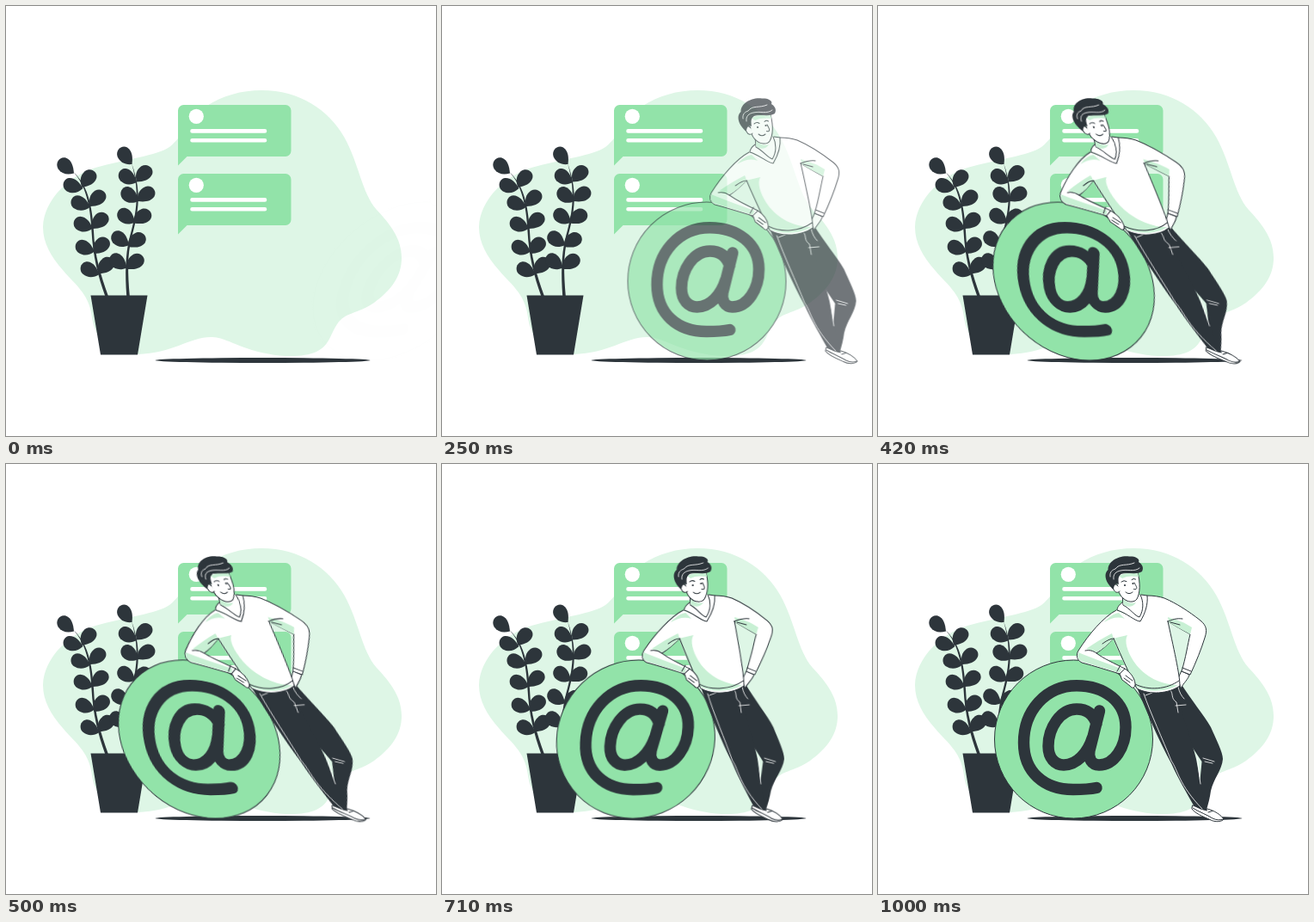
An HTML page without scripts for the animation above (1.04 s loop, 500x500 px).

```html
<!DOCTYPE html>
<html lang="en">
<head>
<meta charset="utf-8">
<title>Leaning on the at sign</title>
<style>
  html, body { margin: 0; width: 100%; height: 100%; overflow: hidden; background: #fff; }
  svg { display: block; width: 100vw; height: 100vh; }
  .dark { fill: #2d353b; }
  .mint { fill: #92e3a9; }
  .pale { fill: #def6e6; }
  .shade { fill: #c8f0d4; }
  .white { fill: #fff; }
  .ink { stroke: #2d353b; stroke-width: 1; stroke-linecap: round; stroke-linejoin: round; }
  .line { fill: none; }
  .seam { fill: none; stroke: #fff; stroke-width: .8; stroke-linecap: round; }
  .bar { stroke: #fff; stroke-width: 4.6; stroke-linecap: round; }
  .at { fill: none; stroke: #2d353b; stroke-width: 13.4; stroke-linecap: round; stroke-linejoin: round; }

  .slide {
    transform-box: view-box;
    transform-origin: 250px 262px;
    animation: slide 1.04s infinite;
  }
  /* fast slide from the right, then two settling sways */
  @keyframes slide {
    0% {
      transform: translateX(248.2px) skewX(-19.8deg);
      opacity: .0073;
      animation-timing-function: cubic-bezier(.342, .109, .499, 1.365);
    }
    54.9% {
      transform: skewX(10deg);
      opacity: 1;
      animation-timing-function: cubic-bezier(.36, -.01, .5, 1.38);
    }
    74.13% {
      transform: skewX(-2deg);
      animation-timing-function: cubic-bezier(.36, -.01, .5, 1.38);
    }
    93.37%, 100% { transform: skewX(0deg); opacity: 1; }
  }
</style>
</head>
<body>
<svg viewBox="0 0 500 500">
  <defs>
    <path id="leaf" d="M0 0C4-7 10-10 17-8.500C25-6 25.500 4 19 7C12 9.500 6 5.500 0 0Z"/>
    <g id="bubble">
      <path class="mint" d="M206.500 115H325a6.500 6.500 0 0 1 6.500 6.500V168.500a6.500 6.500 0 0 1-6.500 6.500H210.500L200 185.500V121.500a6.500 6.500 0 0 1 6.500-6.500Z"/>
      <circle class="white" cx="221.300" cy="128.300" r="8.600"/>
      <path class="bar" d="M216.500 145.400H301M216.500 156.200H301"/>
    </g>
  </defs>

  <path class="pale" d="M297 98C342 98 375 121 393 152C411 184 413 216 431 237C449 256 460 272 460 293C460 315 447 331 428 345C409 358 394 356 385 370C377 382 376 395 361 402C341 411 305 407 280 398C260 391 251 385 238 385C214 385 193 404 153 405C118 405 103 384 100 362C97 334 78 322 66 307C52 291 43 275 43 257C44 225 74 197 104 188C139 178 176 174 190 164C206 152 213 130 232 117C252 104 274 98 297 98Z"/>

  <use href="#bubble"/>
  <use href="#bubble" y="80"/>

  <g class="dark">
    <path d="M118.800 337C110 312 103 290 102 262C100 228 94 208 78.500 193C92 208 98 230 99.500 262C101 291 107 314 115.200 337Z"/>
    <use href="#leaf" transform="translate(79 194.500) rotate(-138)"/>
    <use href="#leaf" transform="translate(89.500 212) rotate(-164)"/>
    <use href="#leaf" transform="translate(88.500 211) rotate(-54)"/>
    <use href="#leaf" transform="translate(98 233.500) rotate(-159)"/>
    <use href="#leaf" transform="translate(98 233) rotate(-47)"/>
    <use href="#leaf" transform="translate(101 258.500) rotate(-157)"/>
    <use href="#leaf" transform="translate(101 259) rotate(-46)"/>
    <use href="#leaf" transform="translate(103 285.500) rotate(-157)"/>
    <use href="#leaf" transform="translate(102.500 288) rotate(-47)"/>
    <use href="#leaf" transform="translate(108.500 312) rotate(-153)"/>
    <use href="#leaf" transform="translate(108 311.500) rotate(-48)"/>

    <path d="M143.800 337C141.500 310 141 290 146 270C152 246 160 220 146 183C157 220 150 246 143.500 270C138.500 290 138.500 312 140.200 337Z"/>
    <use href="#leaf" transform="translate(146.500 184) rotate(-126)"/>
    <use href="#leaf" transform="translate(152 205) rotate(-148)"/>
    <use href="#leaf" transform="translate(152 204.500) rotate(-47)"/>
    <use href="#leaf" transform="translate(154 227) rotate(-144)"/>
    <use href="#leaf" transform="translate(153 227) rotate(-36)"/>
    <use href="#leaf" transform="translate(150 251.500) rotate(-145)"/>
    <use href="#leaf" transform="translate(148.500 252.500) rotate(-34)"/>
    <use href="#leaf" transform="translate(143 278) rotate(-145)"/>
    <use href="#leaf" transform="translate(142 280) rotate(-34)"/>
    <use href="#leaf" transform="translate(140.500 304.500) rotate(-143)"/>
    <use href="#leaf" transform="translate(141 306) rotate(-40)"/>

    <path d="M98.500 336.500H164.500L153 405.500H110Z"/>
    <ellipse cx="298.500" cy="412" rx="125" ry="3"/>
  </g>

  <g class="slide">
    <circle class="mint ink" cx="227.500" cy="320" r="92"/>
    <path class="at" d="M254 302C250 290 242 285 231 285C212 285 198 307 198 328C198 342 206 350 216 350C231 350 244 336 249.500 318M257.500 287L246 333C244 343 249 350 257 350C275 350 288 329 288 306C288 277 264 257.700 231 257.700C195 257.700 169.500 287 169.500 324C169.500 358 193 378.500 227 378.500C238 378.500 247 378 254 376.500"/>

    <!-- legs and shoes -->
    <path class="white ink" d="M366 397C371 399 377 401 383 401C391 403 399 408 402 413C400 416 392 417 386 413.500C378 410 368 406 365 401Z"/>
    <path class="ink line" d="M366 400C374 405 383 408 389 412C393 414 398 414.500 402 413M384 405L389 403.500"/>
    <path class="dark" d="M325 262L352 255C364 274 379 292 387 306C393 320 401 335 401 343C400 356 390 366 387 380C386 388 384 395 382 402L374 400C372 384 375 365 376.500 346C363 325 345 300 325 262Z"/>
    <path class="dark" d="M301 260C315 295 327 322 341 348C349 366 360 384 367 397Q374 402 383 403.500C378 388 374 365 370 343C365 321 352 292 347 260Z"/>
    <path class="seam" d="M309 267C317 290 331 320 341 345C349 356 349 372 377 401M371 341C373 352 373 362 375 372M378 342L391 346M380 346L389 348M340 263C344 268 340 272 347 277L349 289M346 281L358 280M349 259C350 265 353 270 356 273M311 269L319 266"/>

    <!-- hand on hip, torso -->
    <path class="white ink" d="M353 241L362 245C361 250 355 255 352 261L349 250Z"/>
    <path class="white" d="M277 170C270 178 271 195 275 206C284 226 293 246 301 261C316 269 338 267 351 258C351 245 344 215 337 183C336 172 335 162 332 156L313 153L306 182Z"/>
    <path class="shade" d="M273 203C281 224 292 244 300 259C314 266 336 265 349 257C325 257 306 243 297 229C290 218 286 206 290 199Z"/>
    <path class="ink line" d="M274 203C284 226 293 246 301 261C316 269 338 267 351 258C351 245 344 215 335.500 176M299 256C315 264 336 262 350 252"/>

    <!-- arms -->
    <path class="white ink" d="M313 153C320 153 327 154 333 156C347 162 361 171 375 182C382 188 383 193 380 202C376 215 370 230 363 245L353 241C358 225 360 210 363 198C354 193 345 188 337 183"/>
    <path class="shade" d="M337 178C347 181 356 184 365 190L363 198C354 193 345 188 338 184Z"/>
    <path class="ink line" d="M337 183C342 181 347 179 354 180M340 184L351 187M354 237L364 241"/>
    <path class="white ink" d="M281 243L287 238C293 242 298 248 299 255C299.500 260 296 262 293 258L284 251Z"/>
    <path class="ink line" d="M286 249L293 254M288 246L296 252"/>
    <path class="white ink" d="M277 170C262 178 245 198 233 217C230 222 231 228 237 231C252 235 268 240 281 244L287 238C275 232 262 226 254 220C262 215 268 209 274 203"/>
    <path class="shade" d="M233 219C244 224 264 231 283 238L281 243C267 239 252 234 238 230C232 228 231 223 233 219ZM254 219L242 215C252 208 262 202 272 197L274 203C268 209 262 215 254 219ZM263 184C268 178 274 174 280 173L287 180C279 177 271 179 263 184Z"/>
    <path class="ink line" d="M254 220C250 217 246 216 241 217M274 203C270 203 265 206 261 209M278 241L282 234"/>

    <!-- neck and collar -->
    <path class="white ink" d="M284 161C280 164 278 167 278 170C289 173 299 183 305 183C311 173 314 163 313 153L306 152"/>
    <path class="white ink" d="M284 152L285 164C293 168 299 177 304 178C309 170 309 160 305 152"/>
    <path class="shade" d="M285 156C289 161 295 163 300 161C296 167 290 167 285 163Z"/>

    <g transform="translate(-1 0)">
      <path class="white ink" d="M279 132C278 143 281 152 286 156C291 161 299 161.500 302 157C306 150 306 138 303 126L284 127Z"/>
      <path class="white ink" d="M280 142C276 137 272 141 275 146C277 150 280 150 282 148"/>
      <path class="shade" d="M281 130C289 126 297 127 303 126L304 131C297 130 290 130 285 133Z"/>
      <path class="dark" d="M275 146C267 140 262 129 268.500 123C268 114 280 106 293 107.500C300 107 306 110 304 114C309 117 310 121 308 125C302 129 292 126 286 127C280 129 280 134 281 140C278 138 275 141 275 146Z"/>
      <path class="seam" d="M271 131C270 125 274 123 277 122C282 115 290 119 299 115M275 134C274 128 278 125 283 124C291 122 299 126 305 121"/>
      <path class="ink line" d="M284 137Q287 134.500 290 136.500M296 134.500Q298 132.500 300.500 134M299 138C301 142 303 144 301 145.500Q300 146 298.500 145.500M289 149Q293 152.500 297 149"/>
      <circle class="dark" cx="288" cy="141" r="1.100"/>
      <circle class="dark" cx="297.500" cy="139" r="1.100"/>
    </g>
  </g>
</svg>
</body>
</html>
```
